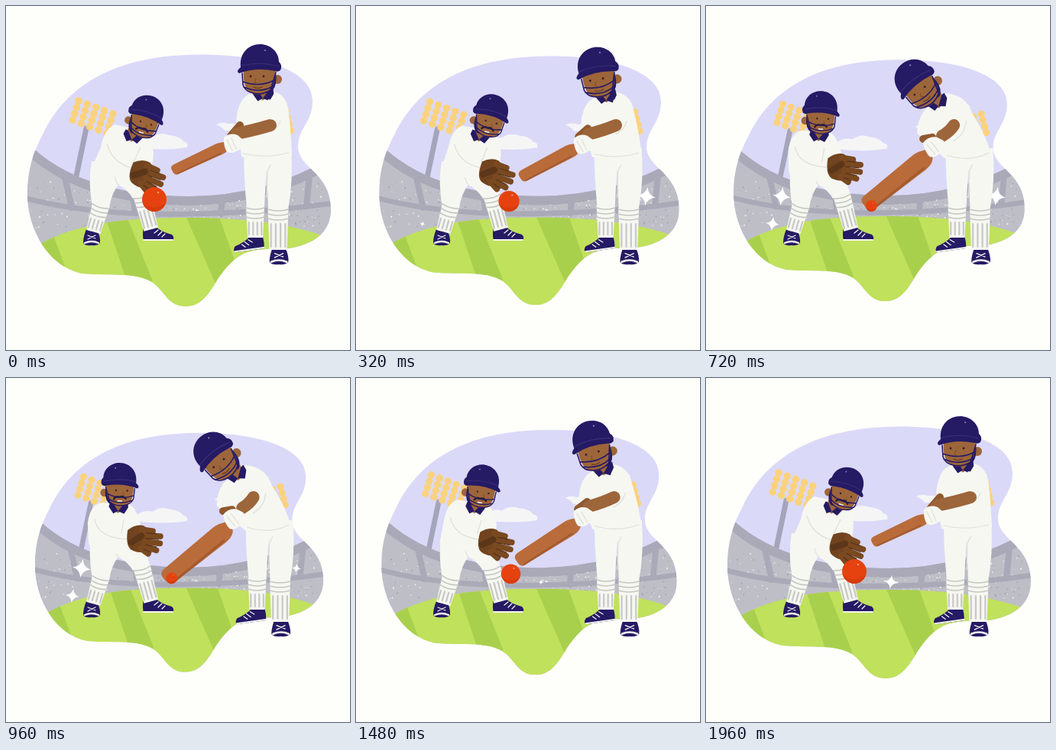
An HTML page for the animation above (2000 ms loop, 450 px wide and 450 px high).

```html
<!DOCTYPE html>
<html lang="en">
<head>
<meta charset="utf-8">
<title>Cricket</title>
<style>
html, body { margin: 0; width: 100%; height: 100%; overflow: hidden; background: #fefefb; }
svg { display: block; width: 100%; height: 100%; }
</style>
</head>
<body>
<svg id="stage" viewBox="0 0 450 450"></svg>
<script>
const LOOP = 2000, STEP = 40;
const navy = "#251a64", skin = "#9d653a", cream = "#f6f7f1", shade = "#dfe0d8";
const stage = document.getElementById("stage");

let seed = 7;
const random = () => (seed = (seed * 16807) % 2147483647) / 2147483647;

const path = (d, fill, extra = "") => `<path d="${d}" fill="${fill}" ${extra}/>`;
const line = (d, color, width, extra = "") =>
  `<path d="${d}" fill="none" stroke="${color}" stroke-width="${width}" stroke-linecap="round" stroke-linejoin="round" ${extra}/>`;
const dot = (x, y, r, fill) => `<circle cx="${x}" cy="${y}" r="${r}" fill="${fill}"/>`;
const group = (transform, content, id = "") => `<g id="${id}" transform="${transform}">${content}</g>`;
const repeat = (n, fn) => Array.from({ length: n }, (_, i) => fn(i)).join("");

const lamps = (x, y, dx, dy, rowX, cols) => repeat(cols * 4, i => {
  const c = i % cols, r = Math.floor(i / cols);
  return dot(x + c * dx + r * rowX, y + c * dy + r * 8.4, 4.8, "#fbd27c");
});

const speckles = repeat(230, () => {
  const x = 28 + random() * 397, d = Math.abs(x - 235) / 200;
  const top = 258 - d * d * 36, bottom = 277 + d * d * 27;
  return dot(x.toFixed(1), (top + random() * (bottom - top)).toFixed(1),
    (0.5 + random() * 0.6).toFixed(1), random() < 0.55 ? "#f2f2f2" : "#a3a3ae");
});

const wallEdge = "M20 173Q90 248 240 249Q350 248 440 190";
const scenery = `
  <rect width="450" height="450" fill="#dbd9f8"/>
  ${line("M92 222L105 160", "#a4a4bb", 7)}
  ${lamps(95, 124, 11.2, 4.3, -2.6, 5)}
  ${lamps(333, 149, 11, -3.8, 2.2, 4)}
  ${path("M165 181Q174 168 190 172Q201 164 214 169Q227 170 232 177Q240 179 237 185Q205 190 165 185Z", "#f5f5f6")}
  ${path("M275 155Q282 151 290 154Q308 152 312 164L286 163Q283 158 275 155Z", "#f5f5f6")}
  ${path(wallEdge + "V340H20Z", "#bebec7")}
  ${line(wallEdge, "#a9a9b8", 12, 'transform="translate(0 6)"')}
  ${speckles}
  ${line("M20 250Q110 275 240 272Q350 270 440 256", "#a9a9b8", 7)}
  ${line("M77 224L86 264M166 248L169 270M283 252L281 272M397 222L393 262", "#a9a9b8", 8)}
  <g clip-path="url(#field)">
    <rect y="270" width="450" height="140" fill="#c0e15c"/>
    ${path("M40 300H62L86 365H40ZM128 270H156L192 360H158ZM233 270H277L312 370L278 372Z", "#a9d04d")}
  </g>`;

const pad = (x, y, angle, w, h) => group(`translate(${x} ${y}) rotate(${angle})`,
  path(`M${-w / 2} 2Q0 -4 ${w / 2} 2L${w / 2 - 2} ${h}H${2 - w / 2}Z`, cream) +
  repeat(3, i => line(`M${-w / 2} ${4 + i * 6}Q0 ${8 + i * 6} ${w / 2} ${4 + i * 6}`, "#c6c6c2", 1.6)) +
  repeat(4, i => {
    const sx = (i - 1.5) * w * 0.23;
    return line(`M${sx} 23V${h - 4}`, "#c8c8c6", 2.2);
  }));

const sideShoe = transform => group(transform,
  path("M1 0Q8 4 16 -1Q25 7 38 10Q42 14 39 18H1Q-1 10 1 0Z", navy) +
  line("M1 17H39", "#f4f4f0", 2) +
  line("M15 8L20 4M20 11L25 6M25 13L29 9", "#f4f4f0", 1.3));
const frontShoe = transform => group(transform,
  path("M-7 -11Q0 -6 7 -11Q12 0 11 7Q7 11 0 10Q-8 11 -11 7Q-11 -1 -7 -11Z", navy) +
  line("M-9 7Q0 3 9 7", "#f4f4f0", 2.4) +
  line("M-5 -3L5 1M-5 2L5 -3", "#f4f4f0", 1.2));

// Heads and collars share one local space with the chin at the origin.
const collar = path("M-9 -8H10L9 5L0 11L-8 5Z", skin) +
  path("M-12 -5L-8 -4L0 8L-7 12L-14 2ZM14 -6L10 -5L0 8L9 12L15 2Z", navy);
const head = moustache => dot(23, -19, 6, skin) +
  path("M-21 -36Q-23 -10 -14 -3Q-1 5 12 -4Q21 -12 21 -36Z", skin) +
  path("M9 -2Q18 -6 21 -28Q23 -12 17 -5Q13 0 9 -2Z", navy) +
  path("M-25 -35C-27 -54 -14 -65 0 -65C14 -65 25 -55 25 -42Q30 -38 27 -31Q23 -28 20 -30Q-5 -35 -27 -27Q-32 -29 -25 -35Z", navy) +
  line("M-24 -37Q0 -43 24 -36", "#3c3077", 1.2) +
  dot(7, -57, 1.1, "#8a84c4") +
  dot(-12, -23, 1.4, "#332329") + dot(5, -23, 1.4, "#332329") +
  line("M-5 -20L-7 -15L-4 -14", "#7d4c26", 1) +
  (moustache ? line("M-10 -11Q-5 -16 -1 -13Q5 -15 8 -10", "#2a1e30", 2.8) + line("M-4 -7H2", "#f4eee4", 1.8)
    : line("M-8 -9Q-3 -6 3 -9", "#653a22", 1.2)) +
  line("M-23 -27L-22 -12Q-19 -4 -12 -2Q2 3 14 -5L21 -28M-22 -16Q0 -8 19 -18M-21 -9Q0 0 17 -10", navy, 1.6);

const glove = path("M-22 -11Q-12 -20 -2 -18L7 -12V12Q-2 18 -12 15Q-24 13 -22 -11Z", "#71431f") +
  line("M-4 -13L10 -12M0 -6L20 -6M0 2L20 3M0 8L16 12M-4 11L6 17", "#7a4920", 7.5) +
  line("M2 -9L14 -9M2 -2L18 -2M2 6L16 8M0 12L10 15", "#57321a", 1.2) +
  line("M-16 4L-4 -5", "#5c3619", 8);

const bat = line("M9 -3L-8 0", "#9c5832", 8) +
  path("M-1 -5Q-8 -8 -13 -8L-74 -7Q-81 -7 -80 0Q-80 7 -75 7L-12 8Q-2 8 1 2Z", "#b96b3a") +
  line("M-13 6L-75 6", "#a25a30", 1.8);

const stars = [
  { x: 380, y: 249, r: 12, from: 120, to: 980 },
  { x: 87, y: 285, r: 9, from: 240, to: 1020 },
  { x: 99, y: 249, r: 12, from: 440, to: 1100 },
  { x: 242, y: 267, r: 9, from: 1400, to: 2000 }
];
const starShape = "M0 -1Q.15 -.15 1 0Q.15 .15 0 1Q-.15 .15 -1 0Q-.15 -.15 0 -1Z";

stage.innerHTML = `
  <defs>
    <clipPath id="blob"><path d="M28 245C28 215 36 190 48 168C70 122 120 63.5 255 63.5C330 63.5 401 82 401 124C401 152 382 160 382 184C382 212 425 218 425 266C425 298 400 314 362 318C314 316 300 324 277 357C263 382 252 393 235 393C214 393 208 376 196 365C174 346 140 354 100 350C58 342 28 295 28 245Z"/></clipPath>
    <clipPath id="field"><path d="M20 328C72 286 145 277 235 277C330 277 390 288 440 311V410H20Z"/></clipPath>
  </defs>
  <g id="scene"><g clip-path="url(#blob)">${scenery}</g></g>
  ${stars.map((s, i) => path(starShape, "#fff", `id="star${i}"`)).join("")}

  ${frontShoe("translate(112 303)")}${sideShoe("translate(179 289)")}
  ${path("M112 203L168 208Q186 228 189 250L166 252Q160 241 147 234Q138 245 135 264L113 264Q107 230 112 203Z", cream)}
  ${line("M147 234Q143 229 142 222", shade, 1.2)}
  ${pad(125, 258, 16, 23, 39)}${pad(177, 245, -15, 23, 49)}
  <path id="keeperShirt" fill="${cream}"/>
  <path id="keeperArm" fill="none" stroke="${cream}" stroke-width="18" stroke-linecap="round"/>
  <path id="keeperSeam" fill="none" stroke="${shade}" stroke-width="1.2"/>
  ${group("", collar, "keeperCollar")}
  ${group("", head(true), "keeperHead")}
  ${group("", glove, "glove")}

  <g id="batterLegs">
    ${sideShoe("translate(336 299) rotate(-8) scale(-1 1)")}${frontShoe("translate(357 327) scale(1.12 1.1)")}
    ${path("M311 188L373 186Q376 230 369 266H343L341 212Q339 240 338 264H315Q311 225 311 188Z", cream)}
    ${line("M341 250L342 216L346 208", shade, 1.4)}
    ${pad(326, 260, 0, 24, 43)}${pad(356, 262, 0, 27, 57)}
  </g>
  <path id="batterShirt" fill="${cream}"/>
  <path id="batterSeam" fill="none" stroke="${shade}" stroke-width="1.2"/>
  ${group("", collar, "batterCollar")}
  ${group("", head(false), "batterHead")}
  ${group("", bat, "bat")}
  <path id="farArm" fill="none" stroke="#8f592e" stroke-width="10" stroke-linecap="round"/>
  <path id="nearArm" fill="none" stroke="${skin}" stroke-width="16" stroke-linecap="round" stroke-linejoin="round"/>
  <path id="sleeve" fill="none" stroke="${cream}" stroke-width="25" stroke-linecap="butt"/>
  ${group("", path("M-9 -7Q-1 -14 9 -10L16 -4Q19 6 9 10Q3 15 -5 12Q-10 4 -9 -7Z", cream) +
    line("M-5 -4L2 10M1 -6L7 8", shade, 1.2), "hands")}
  ${group("", dot(0, 0, 16, "#e5420f") + path("M-15 5Q0 16 15 5Q10 16 0 16Q-10 16 -15 5Z", "#d63b0c") +
    dot(5, -9, 1.2, "#f9a37a"), "ball")}`;

const parts = {};
stage.querySelectorAll("[id]").forEach(el => { parts[el.id] = el; });

// Smooth curve through [time, value] keys, flat at both ends.
function curve(keys) {
  const slope = i => i === 0 || i === keys.length - 1 ? 0 :
    (keys[i + 1][1] - keys[i - 1][1]) / (keys[i + 1][0] - keys[i - 1][0]);
  return t => {
    let i = 0;
    while (i < keys.length - 2 && t > keys[i + 1][0]) i++;
    const [t0, a] = keys[i], [t1, b] = keys[i + 1], span = t1 - t0, u = (t - t0) / span;
    return a + (b - a) * u * u * (3 - 2 * u) +
      span * u * (1 - u) * (slope(i) * (1 - u) - slope(i + 1) * u);
  };
}
const batterLean = curve([[0, 0], [320, .27], [720, .99], [900, 1.03], [1200, .88], [1480, .38], [1640, .15], [1960, 0], [2000, 0]]);
const keeperLean = curve([[0, 0], [320, .2], [720, .97], [960, 1.01], [1200, .99], [1480, .54], [1640, .3], [1960, 0], [2000, 0]]);

const mix = (a, b, k) => a + (b - a) * k;
const morph = (id, from, to, k) => {
  const target = to.match(/-?[\d.]+/g);
  let i = 0;
  parts[id].setAttribute("d", from.replace(/-?[\d.]+/g, n => mix(+n, +target[i++], k).toFixed(2)));
};
const place = (id, x, y, angle = 0, sx = 1, sy = sx) =>
  parts[id].setAttribute("transform", `translate(${x} ${y}) rotate(${angle}) scale(${sx} ${sy})`);

function draw(t) {
  const b = batterLean(t), k = keeperLean(t);
  const zoom = 1 - 0.025 * (1 - Math.cos(2 * Math.PI * t / LOOP));
  parts.scene.setAttribute("transform", `translate(226 228) scale(${zoom}) translate(-226 -228)`);

  stars.forEach((s, i) => {
    const grow = Math.max(0, Math.min(1, (t - s.from) / 200, (s.to - t) / 40));
    place("star" + i, s.x, s.y, 8, s.r * grow);
  });

  morph("keeperShirt",
    "M142 155Q128 162 124 185L112 212Q112 224 130 222L168 224Q182 215 190 200Q194 175 184 164Z",
    "M125 163Q110 166 107 190L108 214Q110 230 130 230L166 229Q174 215 174 195Q172 168 160 165Z", k);
  morph("keeperArm", "M178 174Q188 190 181 209", "M160 177Q172 190 163 207", k);
  morph("keeperSeam", "M132 180Q138 204 164 212M176 185L167 204", "M116 184Q120 209 158 211M154 186L151 204", k);
  place("keeperCollar", mix(166, 147, k), mix(168, 167, k), mix(13, 2, k), 0.88);
  place("keeperHead", mix(174, 148, k), mix(171, 167, k), mix(18, 2, k), -0.86, 0.86);
  place("glove", mix(184, 181, k), mix(223, 212, k), mix(20, 4, k), 1.03);

  place("batterLegs", 2.5 * b, 0);
  morph("batterShirt",
    "M322 114Q304 118 301 150L308 197Q340 204 374 196Q373 170 370 140Q368 116 350 112Z",
    "M285 137Q276 150 276 167L312 199Q345 211 374 197Q367 170 348 140Q340 116 313 114Z", b);
  morph("batterSeam", "M345 164Q358 160 361 143M310 193Q340 200 370 192",
    "M323 177Q339 168 340 150M315 195Q345 205 370 192", b);
  place("batterCollar", mix(336, 301, b), mix(113, 124, b), -22 * b, 0.95);
  place("batterHead", mix(332, 296, b), mix(115, 127, b), -38 * b);
  place("bat", mix(290, 293, k), mix(182, 194, k), mix(-25, -39, k), mix(1, 1.375, k), mix(1, 1.6, k));
  morph("farArm", "M306 156L294 170", "M296 172L284 174", b);
  morph("nearArm", "M346 156Q326 162 302 167", "M324 156Q319 164 309 170", b);
  morph("sleeve", "M355 124L351 149", "M333 127L327 146", b);
  place("hands", mix(294, 295, b), mix(179, 184, b), -14 * b, mix(1, 1.05, b));

  place("ball", mix(194, 216.5, b), mix(253, 261.5, b), 0, mix(1, 0.46, b));
}

function tick(now) {
  draw(Math.floor((now % LOOP) / STEP) * STEP);
  requestAnimationFrame(tick);
}
draw(0);
requestAnimationFrame(tick);
</script>
</body>
</html>
```
